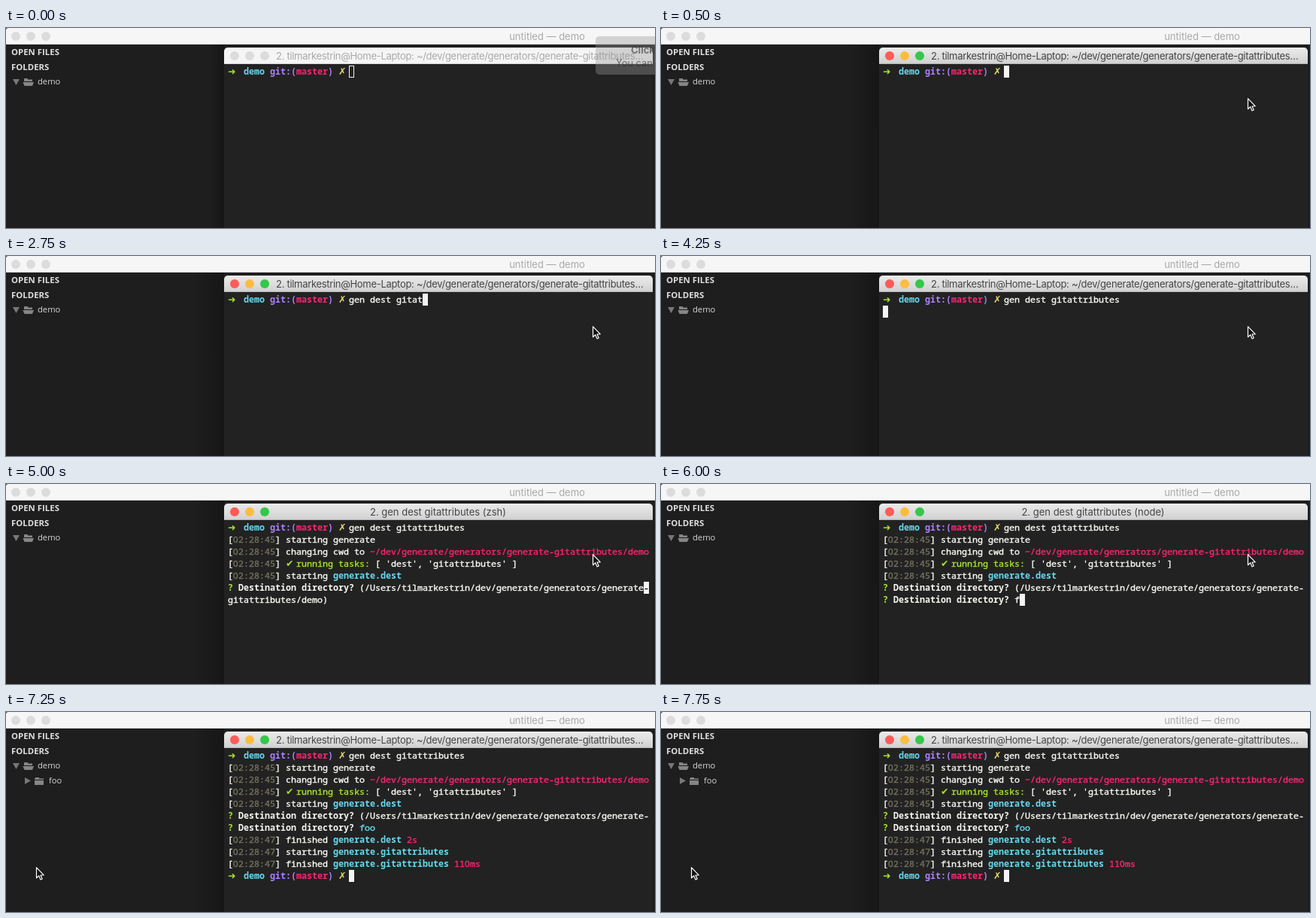
Animation, 863 px wide and 266 px high, one loop 8000 ms. Source, as an HTML page with a canvas:

```html
<!DOCTYPE html>
<html lang="en">
<head>
<meta charset="utf-8">
<title>Terminal demo</title>
<style>
html, body { margin: 0; width: 863px; height: 266px; overflow: hidden; background: #1e1e1e; }
canvas { display: block; }
</style>
</head>
<body>
<canvas id="stage" width="863" height="266"></canvas>
<script>
const ctx = document.getElementById('stage').getContext('2d');
const LOOP = 8000, STEP = 250;
const CELL = 7, ROW = 16, LEFT = 295, TOP = 50;
const MONO = '11.667px "Noto Sans Mono", "DejaVu Sans Mono", monospace';
const SYMBOL = 'bold 12.5px "DejaVu Sans", sans-serif';
const ZERO = '11.667px "Noto Sans", sans-serif';
const UI = 'Inter, sans-serif';
const SIDE = '"Open Sans", sans-serif';

// Upper-case keys are drawn bold.
const COLORS = {
  w: '#f8f8f2', d: '#75715e', g: '#a6e22e', c: '#66d9ef',
  p: '#ae81ff', r: '#f92672', y: '#e6db74'
};

const COMMAND = 'gen dest gitattributes';
const TYPED = [0, 0, 0, 0, 2, 4, 6, 7, 9, 12, 12, 14, 16, 18, 20, 22];
const HOST_TITLE = '2. tilmarkestrin@Home-Laptop: ~/dev/generate/generators/generate-gitattributes…';

const PROMPT = ['G', '➜  ', 'C', 'demo ', 'P', 'git:(', 'R', 'master', 'P', ') ', 'Y', '✗ '];
const QUESTION = ['G', '? ', 'W', 'Destination directory? '];
const log = (second, ...runs) => ['w', '[', 'd', '02:28:' + second, 'w', '] ', ...runs];

const INTRO = [
  log(45, 'w', 'starting generate'),
  log(45, 'w', 'changing cwd to ', 'r', '~/dev/generate/generators/generate-gitattributes/demo'),
  log(45, 'g', '✔ running tasks: ', 'w', "[ 'dest', 'gitattributes' ]"),
  log(45, 'w', 'starting ', 'C', 'generate.dest')
];
const ASK = [...QUESTION, 'w', '(/Users/tilmarkestrin/dev/generate/generators/generate-'];
const RESULT = [
  [...QUESTION, 'c', 'foo'],
  log(47, 'w', 'finished ', 'C', 'generate.dest ', 'r', '2s'),
  log(47, 'w', 'starting ', 'C', 'generate.gitattributes')
];
const DONE = [
  log(47, 'w', 'finished ', 'C', 'generate.gitattributes ', 'r', '110ms'),
  PROMPT
];

function text(str, x, y, font, color, align = 'left') {
  ctx.font = font;
  ctx.fillStyle = color;
  ctx.textAlign = align;
  ctx.fillText(str, x, y);
}

function shape(color, ...points) {
  ctx.beginPath();
  points.forEach(([x, y]) => ctx.lineTo(x, y));
  ctx.closePath();
  ctx.fillStyle = color;
  ctx.fill();
}

function box(x, y, w, h, color) {
  ctx.fillStyle = color;
  ctx.fillRect(x, y, w, h);
}

function panel(x, y, w, h, radii, fill) {
  ctx.beginPath();
  ctx.roundRect(x, y, w, h, radii);
  ctx.fillStyle = fill;
  ctx.fill();
}

function lights(x, y, colors) {
  colors.forEach((color, i) => {
    ctx.beginPath();
    ctx.arc(x + i * 20, y, 6, 0, Math.PI * 2);
    ctx.fillStyle = color;
    ctx.fill();
  });
}

function fade(x0, y0, x1, y1, from, to) {
  const g = ctx.createLinearGradient(x0, y0, x1, y1);
  g.addColorStop(0, from);
  g.addColorStop(1, to);
  return g;
}

function glyph(ch, row, col, color, bold) {
  const x = LEFT + col * CELL, y = TOP + 12 + row * ROW;
  if ('➜✔✗'.includes(ch)) return text(ch, x, y, SYMBOL, color);
  text(ch, x, y, ch === '0' ? ZERO : (bold ? 'bold ' : '') + MONO, color);
  if (bold) return;
  // A hairline outline gives regular text the heavier smoothing of the terminal.
  ctx.strokeStyle = color;
  ctx.lineWidth = 0.4;
  ctx.strokeText(ch, x, y);
}

function line(row, runs) {
  let col = 0;
  for (let i = 0; i < runs.length; i += 2) {
    const key = runs[i], lower = key.toLowerCase();
    for (const ch of runs[i + 1]) {
      if (ch !== ' ') glyph(ch, row, col, COLORS[lower], key !== lower);
      col++;
    }
  }
}

function caret(row, col, focused = true) {
  const x = LEFT + col * CELL, y = TOP + row * ROW;
  if (focused) return box(x, y, CELL, ROW, '#f4f4f4');
  ctx.strokeStyle = '#f4f4f4';
  ctx.lineWidth = 1;
  ctx.strokeRect(x + 0.5, y + 0.5, CELL - 1, ROW - 1);
}

function folder(x, y, open) {
  const gray = '#858585';
  box(x + 1, y, 5, 2, gray);
  if (open) {
    box(x + 1, y + 1.5, 11, 2.5, gray);
    shape(gray, [x - 0.5, y + 5], [x + 14, y + 5], [x + 12, y + 10], [x + 1.5, y + 10]);
  } else {
    box(x, y + 1.5, 12, 1.5, gray);
    box(x, y + 4, 12, 6, gray);
  }
}

function editor(focused, showChild) {
  box(0, 0, 863, 266, '#1e1e1e');
  panel(0, 0, 863, 22, [3, 0, 0, 0], '#f6f6f6');
  box(0, 21, 863, 1, '#d6d6d6');
  lights(13, 11, Array(3).fill('#dcdcdc'));
  text('untitled — demo', 719.5, 16, '13px ' + UI, '#a9a9a9', 'center');

  text('OPEN FILES', 7, 36, 'bold 11.4px ' + SIDE, '#dedede');
  text('FOLDERS', 7, 56, 'bold 11.4px ' + SIDE, '#dedede');
  shape('#777', [9, 68], [18, 68], [13.5, 76]);
  folder(23, 67, true);
  text('demo', 42, 75, '11.2px ' + SIDE, '#d6d6d6');
  if (showChild) {
    shape('#777', [25, 87], [25, 96], [33, 91.5]);
    folder(38, 87, false);
    text('foo', 57, 95, '11.2px ' + SIDE, '#d6d6d6');
  }

  const edge = focused ? 250 : 268;
  box(edge, 22, 290 - edge, 244, fade(edge, 0, 290, 0, 'rgba(0,0,0,0)', 'rgba(0,0,0,.27)'));
}

function terminal(focused, title) {
  panel(290, 26, 570, 240, [5, 5, 0, 0], '#222222');
  panel(290, 26, 570, 22, [5, 5, 0, 0], focused ? fade(0, 26, 0, 48, '#ebebeb', '#d0d0d0') : '#f5f5f5');
  box(290, 47, 570, 1, focused ? '#b4b4b4' : '#d6d6d6');
  lights(304, 37, focused ? ['#fc5b57', '#fdbc40', '#34c84a'] : Array(3).fill('#dcdcdc'));
  // A title too long for the bar is set tighter, beside the buttons.
  const long = title === HOST_TITLE;
  ctx.letterSpacing = long ? '-0.3px' : '0px';
  text(title, long ? 359 : 574.5, 42, '13px ' + UI, focused ? '#454545' : '#a9a9a9', long ? 'left' : 'center');
  ctx.letterSpacing = '0px';
}

function notice() {
  panel(784, 11, 90, 51, 5, 'rgba(150,150,150,.38)');
  text('Click', 831, 34, 'bold 13px ' + UI, 'rgba(50,50,50,.6)');
  text('You can', 811, 51, '12.8px ' + UI, 'rgba(40,40,40,.6)');
}

function pointer(x, y) {
  ctx.save();
  ctx.translate(x, y);
  ctx.lineJoin = 'round';
  shape('#111', [0.5, 0.8], [0.5, 14.8], [3.7, 11.8], [6, 17], [8.2, 16], [6, 11], [10.2, 10.8]);
  ctx.strokeStyle = '#fff';
  ctx.lineWidth = 1.2;
  ctx.stroke();
  ctx.restore();
}

function session(tick, focused) {
  const typed = COMMAND.slice(0, TYPED[Math.min(tick, 15)]);
  line(0, [...PROMPT, 'w', typed]);
  if (tick < 17) return caret(0, 23 + typed.length, focused);
  if (tick < 19) return caret(1, 0);

  INTRO.forEach((runs, i) => line(i + 1, runs));
  if (tick < 20) return caret(5, 0);

  line(5, ASK);
  if (tick < 24) {
    caret(5, 79);
    glyph('-', 5, 79, '#222222', false);
    return line(6, ['w', 'gitattributes/demo)']);
  }
  if (tick < 26) {
    const answer = tick < 25 ? 'f' : 'foo';
    line(6, [...QUESTION, 'w', answer]);
    return caret(6, 25 + answer.length);
  }

  RESULT.forEach((runs, i) => line(i + 6, runs));
  if (tick < 27) return caret(9, 0);
  DONE.forEach((runs, i) => line(i + 9, runs));
  caret(10, 23);
}

function titleAt(tick) {
  if (tick < 18 || tick >= 27) return HOST_TITLE;
  return `2. ${COMMAND} (${tick < 24 ? 'zsh' : 'node'})`;
}

function draw() {
  const tick = Math.floor(performance.now() % LOOP / STEP);
  const focused = tick >= 2;
  editor(focused, tick >= 29);
  terminal(focused, titleAt(tick));
  session(tick, focused);
  if (tick < 1) {
    notice();
  } else {
    const k = Math.min(1, Math.max(0, (tick - 26) / 2));
    pointer(780 - 740 * k, 93 + 113 * k);
  }
  requestAnimationFrame(draw);
}
draw();
</script>
</body>
</html>
```
